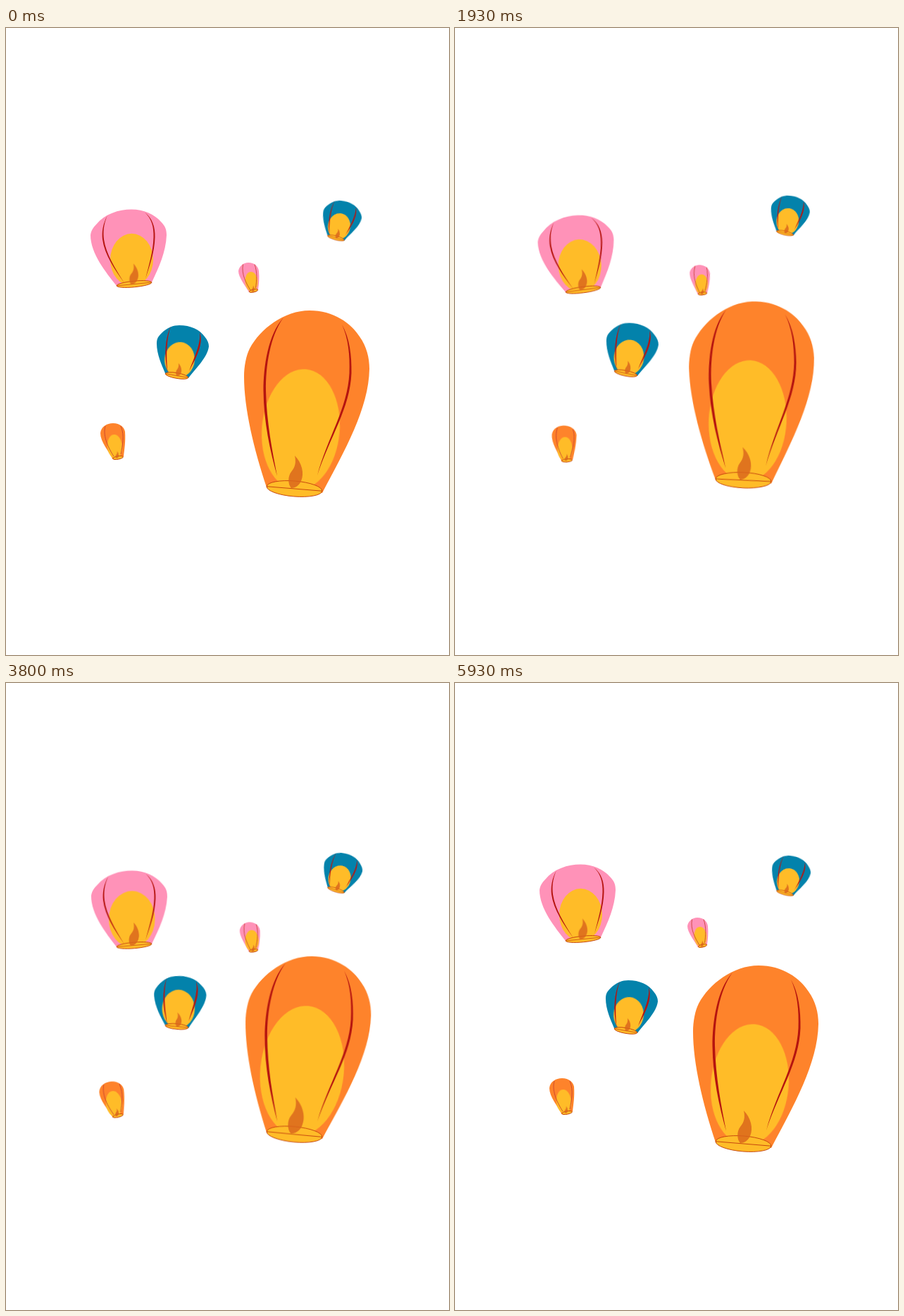
An HTML page without scripts that plays this animation: 629 px wide and 890 px high, repeating every 6010 ms.

```html
<!DOCTYPE html>
<html lang="en">
<head>
<meta charset="utf-8">
<title>Sky lanterns</title>
<style>
  html, body { margin: 0; width: 100%; height: 100%; overflow: hidden; background: #fff; }
  svg { display: block; width: 629px; height: 890px; }

  .orange { fill: #fe832b; }
  .pink { fill: #ff92b8; }
  .blue { fill: #0382ab; }
  .glow { fill: #ffbc28; }
  .rib { fill: #b5140f; }
  .thin { fill: none; stroke: #c43a2c; stroke-width: .8; }
  .rim { fill: #ffbc28; stroke: #c2410c; stroke-width: .9; }
  .flame { fill: #d9641c; fill-opacity: .82; }

  /* --o is the middle of the rim: the point each lantern sways and burns about */
  .float, .sway, .glow, .flame {
    transform-origin: var(--o);
    animation: 6.01s infinite cubic-bezier(.364, 0, .636, 1);
  }
  .float { animation-name: var(--drift); }
  .sway { animation-name: var(--swing); }
  .glow { --grow: 1.085; animation-name: burn; }
  .flame { --grow: 1.13; animation-name: burn; }
  #teal .glow { --grow: 1.1; }

  /* every move is back at rest by 98.5% and holds there until the loop restarts */
  @keyframes drift-early { 0%, 98.5%, 100% { transform: none; } 35% { transform: translateY(var(--dy)); } }
  @keyframes drift-mid { 0%, 98.5%, 100% { transform: none; } 49% { transform: translateY(var(--dy)); } }
  @keyframes drift-late { 0%, 98.5%, 100% { transform: none; } 59.5% { transform: translateY(var(--dy)); } }

  @keyframes burn {
    0%, 36%, 98.5%, 100% { transform: scale(1); }
    71% { transform: scale(var(--grow)); }
  }

  @keyframes swing-large {
    0% { transform: rotate(0deg); animation-timing-function: cubic-bezier(.4, .4, .7, 1); }
    28% { transform: rotate(-2.1deg); animation-timing-function: cubic-bezier(.55, 0, .75, 1); }
    79.5% { transform: rotate(2.5deg); animation-timing-function: cubic-bezier(.3, 0, .6, .6); }
    98.5%, 100% { transform: rotate(0deg); }
  }
  @keyframes swing-teal {
    0%, 98.5%, 100% { transform: rotate(0deg); }
    25% { transform: rotate(1.6deg); }
    71.5% { transform: rotate(-5.2deg); }
  }
  @keyframes swing-far {
    0%, 98.5%, 100% { transform: rotate(0deg); }
    20% { transform: rotate(-3.2deg); }
    70% { transform: rotate(2.5deg); }
  }
  @keyframes swing-bud {
    0%, 98.5%, 100% { transform: rotate(0deg); }
    33% { transform: rotate(6.5deg); }
  }
  @keyframes swing-ember {
    0%, 98.5%, 100% { transform: rotate(0deg); }
    27% { transform: rotate(6deg); }
    68% { transform: rotate(-3deg); }
  }
</style>
</head>
<body>
<svg viewBox="0 0 629 890" xmlns="http://www.w3.org/2000/svg">
  <defs>
    <path id="fire" d="M.5-47C10.5-37 14.5-22 9.5-11C6.5-4 .5-1-4.5-1C-9.5-6-9.5-18-4.5-24C1.5-31 2.5-38 .5-47Z"/>
  </defs>

  <!-- large orange -->
  <g class="float" style="--o:409.5px 654px;--dy:-16.5px;--drift:drift-mid;--swing:swing-large">
    <g class="sway">
      <path class="orange" d="M370 652C352 598 338 540 338 495C338 480 341 465 346 455C361 427 395 401 431 401C465 401 490 419 502 438C512 452 516 468 516 484C515 540 481 600 449 660Z"/>
      <g class="glow"><ellipse cx="418.5" cy="570" rx="55.2" ry="86" transform="rotate(5 418.5 570)"/></g>
      <path class="rib" d="M394 411C372 435 365.5 480 365.5 515C366 560 375 600 385 636C378 600 370 560 369 515C368.5 480 375 437 394 411Z"/>
      <path class="rib" d="M477 421C488 440 491 465 490.5 490C488.5 540 460 580 442 635C457 580 485 540 487.5 490C488.5 465 486 440 477 421Z"/>
      <g class="rim" transform="rotate(4.7 409.5 654)">
        <ellipse cx="409.5" cy="654" rx="39.5" ry="11"/>
        <path d="M370 654H449"/>
      </g>
      <g class="flame"><use href="#fire" transform="translate(409.5 654)"/></g>
    </g>
  </g>

  <!-- large pink -->
  <g class="float" style="--o:182px 364px;--dy:11px;--drift:drift-mid;--swing:swing-large">
    <g class="sway">
      <path class="pink" d="M157 366C142 347 120 320 120 294C121 287 124 283 128 279C140 264 160 257.5 178 257.5C196 257.5 210 264 220 275C226 281 228 286 228 294C227 318 217 340 207 361Z"/>
      <g class="glow"><ellipse cx="178.5" cy="329" rx="30.5" ry="37.2"/></g>
      <path class="rib" d="M144 266C137 279 136 290 137 300C140 322 154 342 168 362C155 341 142 321 139 300C138 290 138 280 144 266Z"/>
      <path class="rib" d="M197 261.5C208 270 212 283 211.5 297C211 318 204 337 198 356C203 336 209 317 209.500 297C210 283 207 271 197 261.5Z"/>
      <g class="rim" transform="rotate(-5.5 182 363.5)">
        <ellipse cx="182" cy="363.5" rx="25" ry="4.3"/>
        <path d="M157 363.5H207" stroke-width=".7"/>
      </g>
      <g class="flame"><use href="#fire" transform="translate(180.5 364.5) scale(.64)"/></g>
    </g>
  </g>

  <!-- near blue -->
  <g class="float" style="--o:242.5px 493.5px;--dy:-6px;--drift:drift-late;--swing:swing-teal">
    <g class="sway">
      <g id="teal" style="--o:242.5px 493.5px">
        <path class="blue" d="M226 490C221 478 214 463 214 448C214 440 217 437 221 433C229 425 238 422 246 422C262 422 275 428 282 438C286 443 288 447 288 452C286 468 270 482 259 497Z"/>
        <g class="glow"><ellipse cx="246.5" cy="470.8" rx="21.3" ry="25" transform="rotate(5 246.5 470.8)"/></g>
        <path class="rib" d="M234 423C226 440 224 464 229.5 489C227 464 228 440 234 423Z"/>
        <path class="rib" d="M275 432C281 448 270 468 260 487C267 468 277 448 275 432Z"/>
        <g class="rim" transform="rotate(10 242.5 493.5)">
          <ellipse cx="242.5" cy="493.5" rx="16.5" ry="3.9"/>
          <path d="M226 493.5H259" stroke-width=".7"/>
        </g>
        <g class="flame"><use href="#fire" transform="translate(244.5 494.5) scale(.4)"/></g>
      </g>
    </g>
  </g>

  <!-- far blue -->
  <g class="float" style="--o:468.5px 298px;--dy:-7.1px;--drift:drift-early;--swing:swing-far">
    <g class="sway">
      <use href="#teal" transform="translate(468.5 298) rotate(5) scale(.745) translate(-242.5 -493.5)"/>
    </g>
  </g>

  <!-- small pink -->
  <g class="float" style="--o:351.5px 373px;--dy:7px;--drift:drift-late;--swing:swing-bud">
    <g class="sway">
      <path class="pink" d="M345 375C340 366 330 354 330 345C331 338 337 333 344 333C353 333 358 338 359 345C360 355 359 364 358 371Z"/>
      <g class="glow"><ellipse cx="348.5" cy="360" rx="9" ry="14" transform="rotate(-5 348.5 360)"/></g>
      <path class="thin" d="M336.5 335.5C334 350 341 362 347 372M353 335.5C357 347 356 358 354.5 369"/>
      <ellipse class="rim" cx="351.5" cy="373" rx="6.3" ry="2" transform="rotate(-13 351.5 373)"/>
      <g class="flame"><use href="#fire" transform="translate(350.5 375) scale(.2)"/></g>
    </g>
  </g>

  <!-- small orange -->
  <g class="float" style="--o:159px 610px;--dy:5.3px;--drift:drift-mid;--swing:swing-ember">
    <g class="sway">
      <path class="orange" d="M151.5 612C146 600 134 588 134 575C135 566 143 561 152 561C162 561 168 567 169 573C170 588 168 598 167 608Z"/>
      <g class="glow"><ellipse cx="154.5" cy="594" rx="10.5" ry="17" transform="rotate(-5 154.5 594)"/></g>
      <path class="thin" d="M141 565C137 580 146 597 153 608M163 565C169 579 165 593 163 605"/>
      <ellipse class="rim" cx="159" cy="610" rx="7.5" ry="2.2" transform="rotate(-10 159 610)"/>
      <g class="flame"><use href="#fire" transform="translate(157.5 611) scale(.22)"/></g>
    </g>
  </g>
</svg>
</body>
</html>
```
